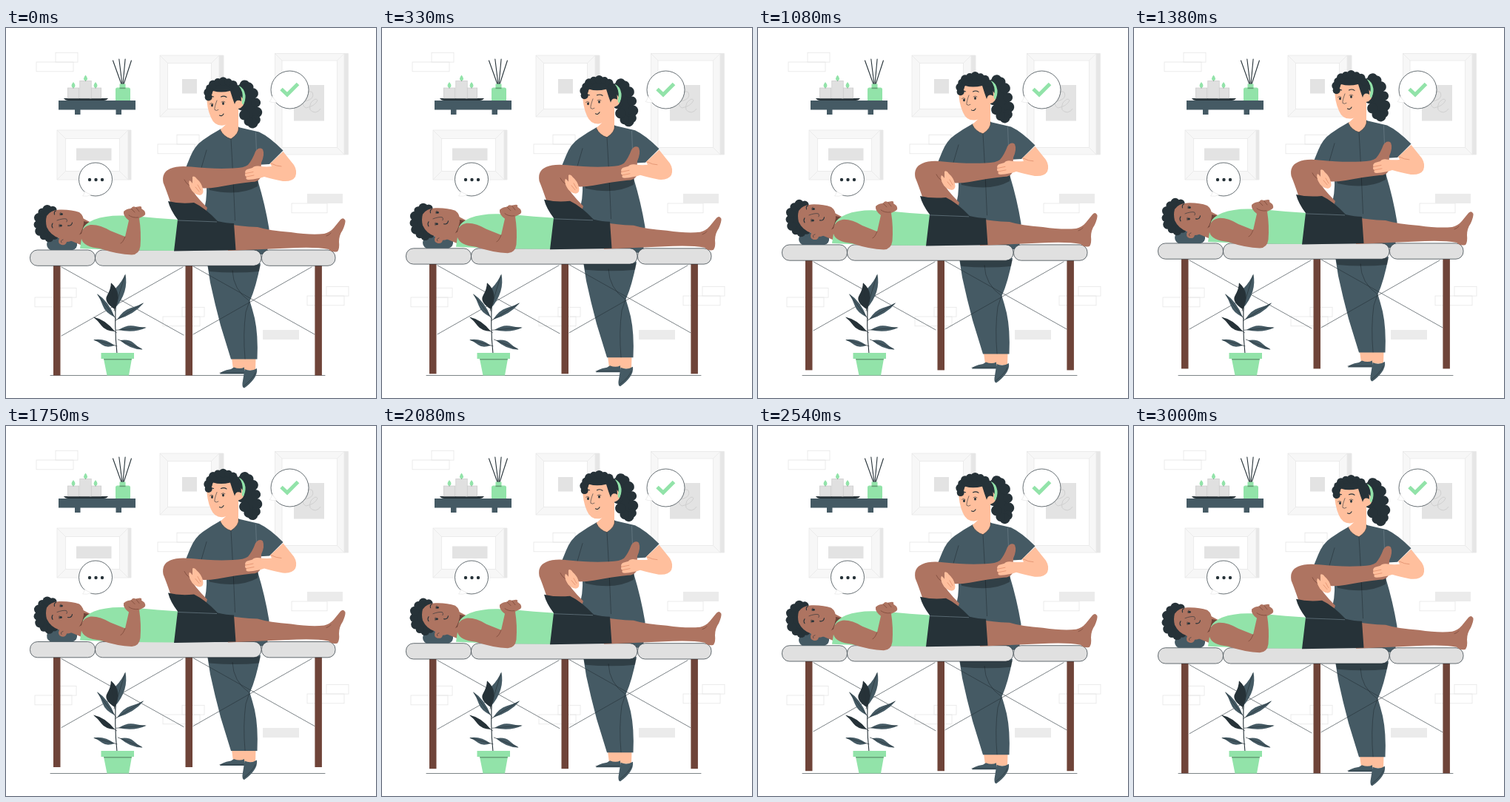
Recreate the animation shown at these times as an HTML page. Size 500 by 500 pixels, loop 3040 ms.

```html
<!DOCTYPE html>
<html lang="en">
<head>
<meta charset="utf-8">
<title>Leg therapy</title>
<style>
html, body { margin: 0; width: 100%; height: 100%; overflow: hidden; background: #fff; }
svg { display: block; width: 100vw; height: 100vh; }
.thin { fill: none; stroke: #263238; stroke-width: .6; stroke-linecap: round; stroke-linejoin: round; }
.ink { fill: none; stroke: #263238; stroke-width: 1.1; stroke-linecap: round; stroke-linejoin: round; }
.dark { fill: #263238; }
.slate { fill: #455a64; }
.green { fill: #92e3a9; }
.brown { fill: #ae7461; }
.skin { fill: #ffbf9d; }
.wood { fill: #6f4439; }
.brick { fill: none; stroke: #e6e6e6; stroke-width: .8; }
.block { fill: #ebebeb; }
.art { fill: #e3e3e3; }
.candle { fill: #e0e0e0; stroke: #c4c4c4; stroke-width: .6; }
.fold { fill: none; stroke: #7d4b3c; stroke-width: .8; stroke-linecap: round; }
.crease { fill: none; stroke: #e08f6c; stroke-width: .8; stroke-linecap: round; }
.seam { fill: none; stroke: #6d808a; stroke-width: .7; }
.pad { fill: #e0e0e0; stroke: #263238; stroke-width: .7; }
.shade { fill: #000; opacity: .3; }
.bubble { fill: #fff; stroke: #263238; stroke-width: .7; }
.tip { fill: #fff; stroke: #ddd; stroke-width: .5; }
</style>
</head>
<body>
<svg viewBox="0 0 500 500">
  <g id="wall"></g>
  <path d="M403 89q-8 8 1 10q14-3 10-12q-5-4-11 5q-5 12 2 16q12-2 16-10q-2-5-9 3q-5 12 6 13q5-1 7-5" fill="none" stroke="#d0d0d0"/>

  <!-- shelf -->
  <path class="slate" d="M71 98H175V110.500H156V117H148.500V110.500H100.500V117H93V110.500H71Z"/>
  <path class="dark" d="M78 95H138Q136 98 132 98H84Q80 98 78 95Z"/>
  <g id="candles"></g>
  <path id="sticks" class="ink"/>
  <path class="green" d="M153.500 75.500h8V80.500h4q2.500 0 2.500 2.500V98h-20V83q0-2.500 2.500-2.500h3Z"/>
  <path class="shade" d="M153.500 80.500h8v1.700h-8Z"/>

  <!-- speech bubbles -->
  <circle class="bubble" cx="383.500" cy="83.500" r="25.500"/>
  <path class="tip" d="M359.500 92Q359 97 356 99.500Q361 101.500 366 100.500Z"/>
  <path d="M372 82.500L380 90L394.500 75.500" fill="none" stroke="#92e3a9" stroke-width="5"/>
  <circle class="bubble" cx="121" cy="204.500" r="22.500"/>
  <path class="tip" d="M106 221Q106 225 103.500 227Q110 228 115 225.500Z"/>
  <g id="dots" class="dark"></g>

  <path class="thin" d="M60 469.500H431"/>

  <g id="float">
    <!-- therapist: legs -->
    <path class="skin" d="M305 446H337.500L337 463L307 461Z"/>
    <path class="slate" d="M289 467.500Q290 463.500 304 461L308 458.500Q316 461.500 322 458.500V467.500Z"/>
    <path class="slate" d="M322.500 461Q331 465 339 460Q340 467 335 474Q330 481 322 486.500Q319 486 319.500 480Z"/>
    <path class="thin" d="M289 466H321M321 484Q333 475 337 466"/>
    <path class="slate" d="M271 312L276 344Q282 372 290 402L304 447.500H339.500Q341 415 336 392Q333 380 329.500 369Q338 350 344 318Z"/>
    <path class="thin" d="M306 328Q307 354 329 369L324 384Q320 413 323 447"/>
    <path class="shade" d="M272.500 320H344L342 329Q310 332 274.500 329Z"/>

    <!-- therapist: body and head -->
    <g id="tail" class="dark"></g>
    <path class="slate" d="M290 136.500Q278 143 266 151.500Q255 159 249 174L242 191L263 194L271 211Q272 235 266 250V306H353L355.500 271Q350 238 340.500 207L339 185L356 184L374.500 165.500Q356 147 342 140.500L314 134Z"/>
    <path class="skin" d="M289.500 137.500L303 125L314 106V134Q316 142 304 150Q294 147 289.500 137.500Z"/>
    <path class="thin" d="M289.500 137.500Q294 147 304 150Q315 143 314.500 134M304 150Q307 200 309.500 260M264 189L271 165"/>
    <path class="seam" d="M337.500 141Q339 165 338 185"/>
    <path class="shade" d="M272 207Q300 209 341 204L340 214Q315 228 275 219Z"/>
    <path class="skin" d="M271 89Q271 108 277 121Q282 133 294 131.500Q309 128 314 109Q322 107 322 98L304 76H278Z"/>
    <path class="dark" d="M270 97Q266 74 294 70Q318 70 318 99Q311 95 309 103Q306 95 303 85Q290 88 280 85Q276 93 270 97Z"/>
    <g id="cap" class="dark"></g>
    <path class="green" d="M314.500 78Q322 81 323.500 91Q324 98 320.500 104Q317.500 102 319.500 96Q321 86 314.500 78Z"/>
    <path class="ink" d="M275 94.500q3-3 5.500-1.500M290.500 93q4-2 7.500.5M288.500 118q3.500 2 5.500-2"/>
    <path class="thin" d="M285 98Q281.500 107 282 110.500Q284 112.500 287 110.500M275.500 102.500q2-2 4.500 0M291 100q2.500-2 5 0"/>
    <ellipse class="dark" cx="278.500" cy="104.500" rx="1.400" ry="1.900"/>
    <ellipse class="dark" cx="293.500" cy="102" rx="1.400" ry="1.900"/>

    <!-- table -->
    <path class="thin" d="M75 323L240 415M239 323L75 416M253 414L413 323M253 322L417 414"/>
    <g id="table"></g>

    <!-- patient: head -->
    <path class="slate" d="M56 288Q60 281 75 284Q94 283 96 290Q97 298 90 300H60Q53 296 56 288Z"/>
    <g id="patientHair" class="dark"></g>
    <path class="brown" d="M94 252L117 264L108 296L84 286Z"/>
    <path class="wood" d="M104 261L114 263Q107 268 105 276L98 280Z"/>
    <path class="brown" d="M55 254Q60 246 72 245.500Q88 245 99 249Q106 254 105 264Q103 277 95 284Q88 289 82 289Q81 294 75 293Q69 291 72 284Q60 280 55 269Q53 261 55 254Z"/>
    <path class="ink" d="M65.500 252q-1-4 2-5M63 270q-2-3 0-6M83.500 267q5 1 6-4"/>
    <path class="thin" d="M69 260Q77 257 81.500 258Q83.500 260 82 262M75 290q-2-3 2-4M73 253q-1-3 1-4M72 269q-1-3 0-4"/>
    <ellipse class="dark" cx="75" cy="251.500" rx="1.900" ry="1.500"/>
    <ellipse class="dark" cx="74" cy="267" rx="1.900" ry="1.500"/>

    <!-- patient: body -->
    <path class="brown" d="M303 265Q315 268 340 269Q356 274 385 276Q412 280 430 278Q438 276 443 270L452 259Q456 255 458.500 260Q459 264 455 273Q450 280 450 289Q451 298 448 302Q441 304 436 299Q420 296 393 297L300 301Z"/>
    <path class="green" d="M100 298Q102 285 104 271Q107 264 119 259Q135 253 157 253.500Q180 254 205 257L234 259L230 301Q160 301 100 298Z"/>
    <path class="brown" d="M222 235Q217 220 212.500 209Q210 195 222 190Q232 185.500 250 187.500Q282 191 307 189.500Q322 189 327 185Q333 178 337 167Q342 160 347 164Q350 171 345 182L344 202Q341 208 332 208Q312 210 286 215Q262 219 248 213Q254 225 272 243L268 255Z"/>
    <path class="dark" d="M219 234Q235 238 254 236Q269 243 286 261Q298 264 308 264L310.500 300L227 301.500L232 259Q222 246 219 234Z"/>
    <path class="seam" d="M232 260Q260 261 285 262"/>
    <path class="brown" d="M102 285Q100 269 114 266Q126 265 141 274L161 282L166 260Q158 254 159 248Q163 244 169 244Q171 240 175 242L181 241Q184 241 183 244L187 247Q190 252 186 254L180 257Q183 276 181.500 295Q180 306 170 306.500Q151 306 127 298Q105 296 102 285Z"/>
    <path class="fold" d="M161 282Q158 290 155 291M166 253Q171 257 179 256M169 244l5 5M176 243l4 5M248 213Q243 210 241 205M433 281q4-1 6-4"/>

    <!-- therapist: hands -->
    <path class="skin" d="M252 201Q255 199 258 204Q264 209 266 217Q268 225 262 226Q253 225 249 216Q246 209 248 206Q250 207 252 210Z"/>
    <path class="skin" d="M357 183L374.500 167L389 185Q394 193 391 201Q387 208 374 207Q359 204 349 201Q340 204 328 205Q323 205 325 201Q322 200 323.500 196.500Q322 193 326 191L333 189Q335 186 341 186.500Q351 188 359 187Z"/>
    <path class="crease" d="M256 215l5 6M259 212l4 7M325 201l10-2M324 196.500l10-2M358 183Q366 187 372 187"/>
  </g>

  <!-- plant -->
  <path class="ink" d="M150 440Q146 403 149 363"/>
  <g id="leaves"></g>
  <path class="green" d="M128.500 439H173V447H170L166 469.500H136.500L132 447H128.500Z"/>
  <path class="shade" d="M132 447h38l-.3 1.500h-37.300Z"/>
</svg>
<script>
const $ = id => document.getElementById(id);
const rad = deg => deg * Math.PI / 180;
const rect = (cls, x, y, w, h, rx = 0) =>
  `<rect class="${cls}" x="${x}" y="${y}" width="${w}" height="${h}" rx="${rx}"/>`;
const repeat = (n, make) => Array.from({ length: n }, (_, i) => make(i)).join("");

// A long brick with a short one resting on its right half.
const bricks = (x, y) => rect("brick", x, y, 50, 12.8) + rect("brick", x + 26, y - 12.7, 30, 12.8);

// Picture frame: side, face, mitred corners and opening.
function frame(x, y, w, h, inset, side) {
  const corner = (cx, cy, sx, sy) => `M${cx} ${cy}l${sx * inset} ${sy * inset}`;
  const mitres = corner(x, y, 1, 1) + corner(x + w, y, -1, 1) + corner(x, y + h, 1, -1) + corner(x + w, y + h, -1, -1);
  return `<g stroke="#e8e8e8" stroke-width=".8">
    <path d="M${x + w} ${y}h${side}v${h}h${-side}Z" fill="#e6e6e6"/>
    <rect x="${x}" y="${y}" width="${w}" height="${h}" fill="#f7f7f7"/><path d="${mitres}"/>
    <rect x="${x + inset}" y="${y + inset}" width="${w - 2 * inset}" height="${h - 2 * inset}" fill="#fff"/></g>`;
}

$("wall").innerHTML = bricks(41, 46) + bricks(205, 157) + bricks(39, 364) + bricks(212, 390) + bricks(407, 362)
  + rect("brick", 386, 237, 48, 12.8) + rect("block", 407, 224, 48, 13) + rect("block", 347, 408, 49, 13)
  + frame(208, 37, 80, 83, 10.5, 6) + rect("art", 238, 69, 20, 19.5)
  + frame(363.5, 34.5, 93.5, 136.5, 9.5, 5.5) + rect("art", 389, 77, 41, 48.5)
  + frame(69, 138, 96, 67, 11.5, 4) + rect("art", 95, 162.5, 47.5, 16.5);

const candle = (x, top) => rect("candle", x - 7.7, top, 15.4, 95 - top)
  + `<path class="thin" d="M${x} ${top}v-3"/><path class="green" d="M${x} ${top - 8}q5 6 0 8q-5-2 0-8Z"/>`;
$("candles").innerHTML = candle(91, 81) + candle(121, 81) + candle(107.5, 71.5);
$("sticks").setAttribute("d", repeat(4, i => `M${156 + i} 76L${144.5 + 8.3 * i} ${i % 3 ? 42 : 44}`));
$("dots").innerHTML = repeat(3, i => `<circle cx="${113 + 8.5 * i}" cy="205" r="2.2"/>`);

$("table").innerHTML = repeat(3, i => rect("wood", 64 + 176.7 * i + (i % 2) * 1.8, 320, 9.5, 149.5))
  + rect("pad", 32.5, 300, 88, 21.3, 10) + rect("pad", 120.5, 300, 224.5, 21.3, 10) + rect("pad", 345.5, 300, 99.5, 21.3, 10);

// Round curls spaced evenly along an elliptic arc, angles in degrees.
const curls = (cx, cy, rx, ry, from, to, n, r) => repeat(n, i => {
  const a = rad(from + (to - from) * i / (n - 1));
  return `<circle cx="${cx + rx * Math.cos(a)}" cy="${cy + ry * Math.sin(a)}" r="${r + (i % 2) * .8}"/>`;
});
const ball = (cx, cy, rx, ry) => `<ellipse cx="${cx}" cy="${cy}" rx="${rx}" ry="${ry}"/>`;
$("tail").innerHTML = `<g transform="rotate(-12 328 103)">${ball(328, 103, 11, 28) + curls(328, 103, 10, 26, 0, 330, 12, 6.3)}</g>`;
$("cap").innerHTML = curls(293, 89, 20, 17, 165, 335, 9, 5);
$("patientHair").innerHTML = ball(58, 264, 15, 20) + curls(58, 264, 15, 19, 60, 290, 9, 5.5);

// A pointed leaf with its midrib; angle is measured upward from the right.
function leaf(x, y, angle, length, width, cls = "slate") {
  const c = length * .55;
  return `<g transform="translate(${x} ${y}) rotate(${-angle})">
    <path class="${cls}" d="M0 0Q${c * .6} ${-width} ${c} ${-width * .55}T${length} 0Q${c} ${width} 0 0Z"/>
    <path class="thin" d="M-3 0H${length * .95}"/></g>`;
}
$("leaves").innerHTML = leaf(147, 379, 73, 49, 12)
  + leaf(147, 380, 98, 36, 14, "dark")
  + repeat(3, i => leaf(147, 391 + 19 * i, 127 + 19 * i, 40 - 5 * i, 6.5, i === 1 ? "dark" : "slate"))
  + repeat(3, i => leaf(150 + 2 * i, 394 + 14 * i, 32 - 27 * i, 43 - 5 * i, 6.5));

const LOOP = 3040, RISE = 10;
const start = performance.now();
function draw(time) {
  const phase = (time % LOOP) / LOOP;
  const lift = RISE * (1 - Math.abs(2 * phase - 1));
  $("float").setAttribute("transform", `translate(0 ${-lift.toFixed(3)})`);
}
function tick() {
  draw(performance.now() - start);
  requestAnimationFrame(tick);
}
tick();
</script>
</body>
</html>
```
